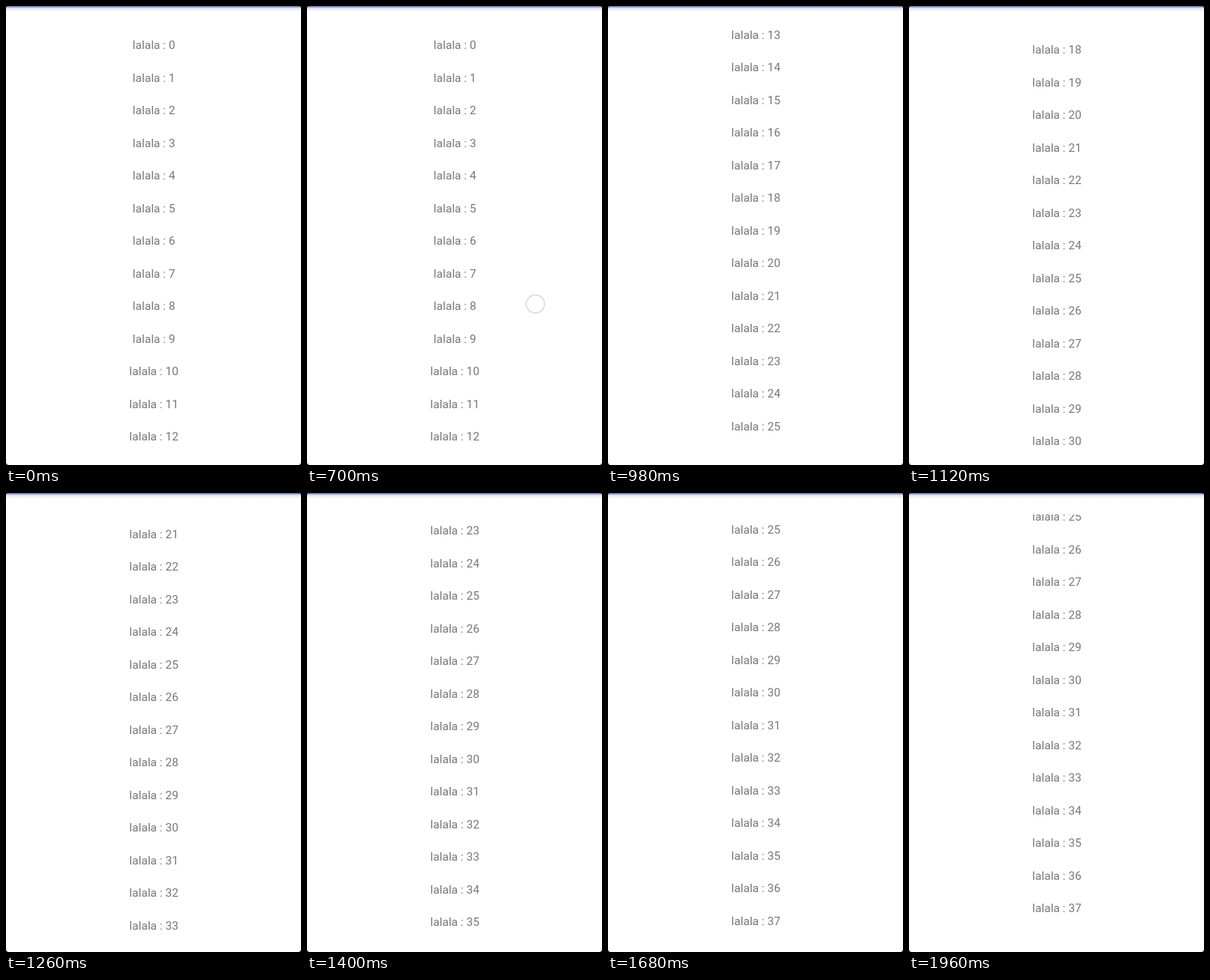
Recreate the animation shown at these times as an HTML page with a canvas. Size 384 by 598 pixels, loop 2030 ms.

```html
<!DOCTYPE html>
<html lang="en">
<head>
<meta charset="utf-8">
<title>List fling</title>
<style>
  html, body { margin: 0; width: 100%; height: 100%; overflow: hidden; background: #fff; }
  canvas { display: block; }
</style>
</head>
<body>
<canvas id="stage" width="384" height="598"></canvas>
<script>
const ctx = document.getElementById('stage').getContext('2d');
const W = 384, H = 598;
const LOOP = 2030, REST = 700, STEP = 70;
const ROW = 42.5, BASELINE = 56.3;
const LIST = { top: 28, bottom: 573 };

// Scroll offset per step: drag, then decelerating fling.
const scroll = [0, 82, 269, 432, 566, 673, 759, 831, 890, 939.5, 979.5,
  1010.5, 1034.5, 1052.5, 1066, 1073.5, 1078.5, 1081.5, 1082.5];
const touches = [[297, 388], [317, 306], [322, 291]];

const shade = ctx.createLinearGradient(0, 0, 0, 8);
shade.addColorStop(0, '#5965a6');
shade.addColorStop(0.16, '#8e97c6');
shade.addColorStop(0.3, '#d5d8ea');
shade.addColorStop(0.6, '#f1f2f8');
shade.addColorStop(1, '#fff');

function drawList(offset) {
  ctx.save();
  ctx.beginPath();
  ctx.rect(0, LIST.top, W, LIST.bottom - LIST.top);
  ctx.clip();
  ctx.font = '15.1px Roboto, sans-serif';
  ctx.textAlign = 'center';
  ctx.fillStyle = '#777';
  const first = Math.max(0, Math.floor(offset / ROW) - 1);
  for (let n = first; n < first + 16; n++) {
    ctx.fillText('lalala : ' + n, 192.5, BASELINE + n * ROW - offset);
  }
  ctx.restore();
}

function drawTouch([x, y]) {
  ctx.beginPath();
  ctx.arc(x + 0.3, y + 0.2, 11.8, 0, Math.PI * 2);
  ctx.strokeStyle = '#e0e0e0';
  ctx.lineWidth = 2;
  ctx.stroke();
}

function drawCorner(x, y, dx, dy) {
  ctx.beginPath();
  ctx.moveTo(x, y);
  ctx.lineTo(x + dx, y);
  ctx.lineTo(x, y + dy);
  ctx.fill();
}

function draw(time) {
  const step = Math.floor((time % LOOP - REST) / STEP);
  ctx.fillStyle = '#fff';
  ctx.fillRect(0, 0, W, H);
  drawList(scroll[Math.max(0, step)]);
  if (touches[step]) drawTouch(touches[step]);

  ctx.fillStyle = shade;
  ctx.fillRect(0, 0, W, 8);
  ctx.fillStyle = '#333';
  drawCorner(0, 0, 2, 2);
  drawCorner(W, 0, -2, 2);
  drawCorner(0, H, 2.5, -2.5);
  drawCorner(W, H, -2.5, -2.5);
}

const start = performance.now();
function tick() {
  draw(performance.now() - start);
  requestAnimationFrame(tick);
}
tick();
</script>
</body>
</html>
```
